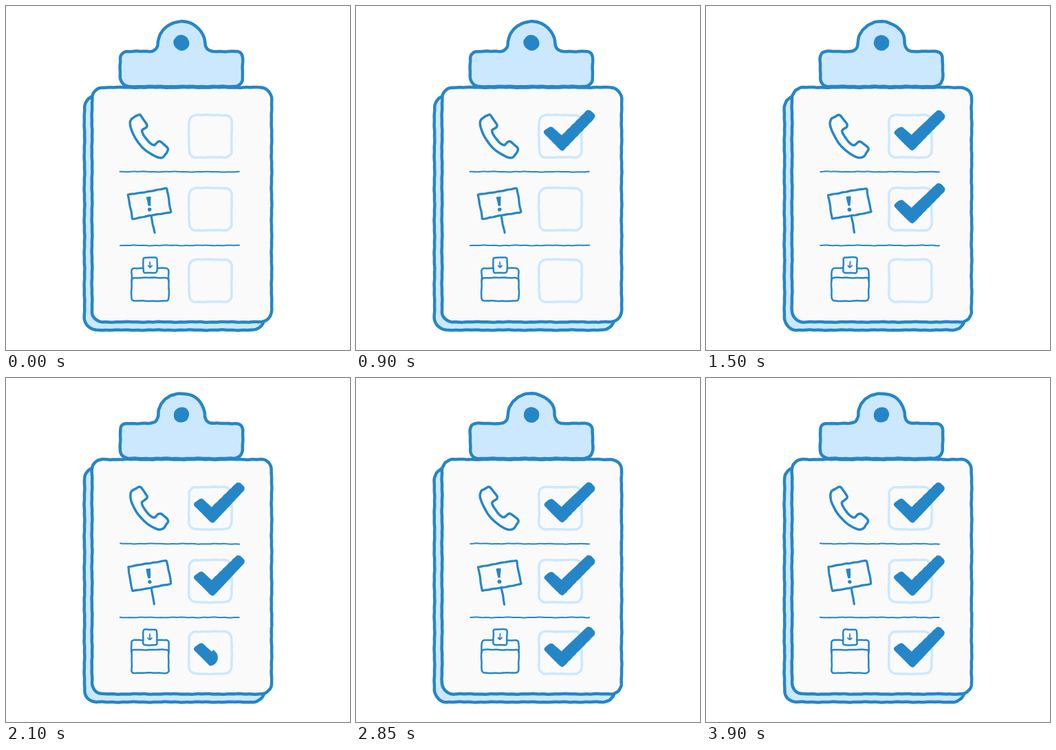
Write an HTML page that moves like this. It is 500 px wide and 500 px high and loops after 4.05 s.

```html
<!DOCTYPE html>
<html lang="en">
<head>
<meta charset="utf-8">
<title>Checklist</title>
<style>
  html, body { margin: 0; width: 100%; height: 100%; overflow: hidden; background: #fff; }
  svg { display: block; width: 100vw; height: 100vh; }
  .line { stroke: #2586c7; stroke-linecap: round; stroke-linejoin: round; fill: none; }
  .light { fill: #cce8ff; }
  .paper { fill: #fafafa; }
  .blue { fill: #2586c7; }
  .box { fill: none; stroke: #cce8ff; stroke-width: 3.6; }
  .check { fill: #2586c7; stroke: #2586c7; stroke-width: 8; stroke-linejoin: round; }
</style>
</head>
<body>
<svg viewBox="0 0 500 500">
  <rect class="line light" x="114" y="130" width="262" height="341" rx="18" stroke-width="4.5"/>
  <path class="line light" stroke-width="4.5" d="M178 117Q166 115 166 103V77Q166 66 177 66H208Q220 66 221 54A34 31.5 0 0 1 289 54Q290 66 302 66H333Q344 66 344 77V103Q344 115 332 117Z"/>
  <circle class="blue" cx="255" cy="53.5" r="11.3"/>
  <rect class="line paper" x="125" y="118.3" width="261" height="341" rx="16" stroke-width="4.5"/>
  <path class="line" stroke-width="2" d="M166 240.700L339 241.200"/>
  <path class="line" stroke-width="2" d="M166 348H339"/>

  <path class="line" stroke-width="3.5" d="M184 163L192 158.500Q194.500 157 196.500 160L204.500 171Q206.500 174 203.500 176.500L198 180Q196 183 204 193.500Q211 203 216 202.500L220 198.500Q222.500 196 225.500 197.500L234 204.500Q237 207.500 235 210.500L230 218Q226 222 219 219.500Q198 210.500 187 190Q178.500 174 181 167Q182 164 184 163Z"/>

  <path class="line" stroke-width="3.200" d="M177.500 274.500L233.500 265L240 299.500L183.500 309.500Z"/>
  <path class="line" stroke-width="3.200" d="M211.500 307L215.700 329"/>
  <path class="blue" d="M203.500 277.500L210.500 276.500L210 290.500L206.500 291Z"/>
  <circle class="blue" cx="208.700" cy="296" r="2.900"/>

  <g class="line" stroke-width="2.500">
    <rect x="182.500" y="381" width="54" height="47.700" rx="4"/>
    <path d="M182.500 399Q182.500 395 186.500 395H232.500Q236.500 395 236.500 399"/>
    <rect class="paper" x="199.500" y="365.500" width="20" height="22.500" rx="2.500"/>
    <path stroke-width="1.800" d="M209.200 372V380"/>
    <path stroke-width="1.800" d="M206.300 377.500L209.200 380.500L212.100 377.500"/>
  </g>
</svg>
<script>
const LOOP = 4050, BEAT = 150, DRAW = 600, POSES = 3;
const rows = [{ y: 0, start: 70 }, { y: 106, start: 900 }, { y: 210, start: 1875 }];
const svg = document.querySelector('svg');

svg.insertAdjacentHTML('beforeend', rows.map(({ y }, i) => `
  <g transform="translate(0 ${y})">
    <mask id="wipe${i}" maskUnits="userSpaceOnUse" x="250" y="130" width="120" height="100">
      <path class="wipe" d="M277 177L299.5 200L345 155" pathLength="1" fill="none" stroke="#fff"
        stroke-width="24" stroke-linecap="round" stroke-dasharray="1 2"/>
    </mask>
    <rect class="box" x="266" y="158.5" width="62" height="61.5" rx="10"/>
    <g class="mark" mask="url(#wipe${i})">
      <path class="check" d="M277.3 183.7L283.5 179.3L299 193L338 155L343.7 160.5L299.7 206.3Z"/>
    </g>
  </g>`).join(''));

// Redraws a shape as a slightly uneven hand-drawn line, once per pose.
function sketch(el) {
  const length = el.getTotalLength(), n = Math.ceil(length / 2);
  const closed = el.tagName !== 'path' || el.getAttribute('d').endsWith('Z');
  const path = document.createElementNS(svg.namespaceURI, 'path');
  for (const name of ['class', 'stroke-width'])
    if (el.hasAttribute(name)) path.setAttribute(name, el.getAttribute(name));
  const poses = Array.from({ length: POSES }, (_, pose) => {
    const wave = (a, b) => .28 * Math.sin(a * .13 + b * .07 + pose * 2.1) + .17 * Math.sin(a * .41 - b * .53 + pose * 4.3);
    let d = '';
    for (let i = 0; i <= n; i++) {
      const { x, y } = el.getPointAtLength(length * i / n);
      d += `${i ? 'L' : 'M'}${(x + wave(y, x)).toFixed(2)} ${(y + wave(x, y)).toFixed(2)}`;
    }
    return closed ? d + 'Z' : d;
  });
  el.replaceWith(path);
  return { path, poses };
}

const shapes = [...svg.querySelectorAll('rect, circle, path:not(.wipe)')].map(sketch);
const wipes = svg.querySelectorAll('.wipe');
const marks = svg.querySelectorAll('.mark');
const ease = u => u < .5 ? 2 * u * u : 1 - 2 * (1 - u) ** 2;
let last = -1;

function frame(now) {
  const t = now % LOOP;
  const beat = Math.floor(t / BEAT);
  // Outlines change once per beat; the ticks also advance part-way through it.
  const step = beat * BEAT + (t % BEAT >= 90 ? 90 : 0);
  if (step !== last) {
    last = step;
    for (const { path, poses } of shapes) path.setAttribute('d', poses[beat % POSES]);
    rows.forEach(({ start }, i) => {
      const p = ease(Math.min(1, Math.max(0, (step - start) / DRAW)));
      marks[i].style.display = p > 0 ? '' : 'none';
      wipes[i].setAttribute('stroke-dashoffset', 1 - p);
    });
  }
  requestAnimationFrame(frame);
}
frame(0);
</script>
</body>
</html>
```
